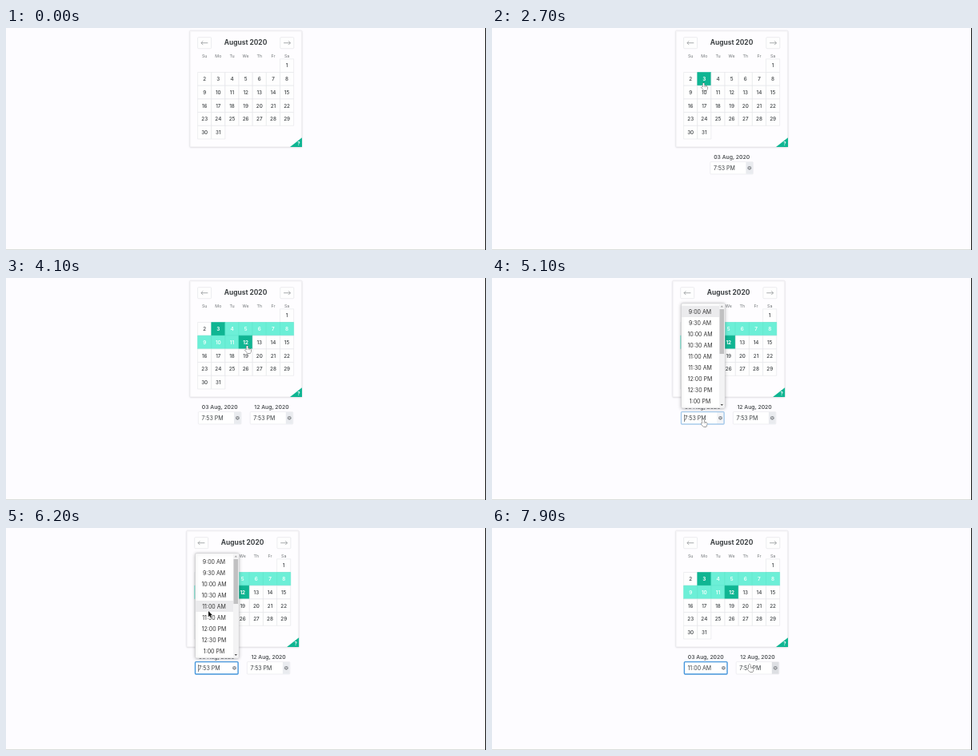
An HTML page with a canvas for the animation above (8000 ms loop, 600x278 px).

```html
<!DOCTYPE html>
<html lang="en">
<head>
<meta charset="utf-8">
<title>Date and time range picker</title>
<style>
  html, body { margin: 0; width: 100%; height: 100%; overflow: hidden; background: #fdfcff; }
  canvas { display: block; width: 600px; height: 278px; }
</style>
</head>
<body>
<canvas id="stage"></canvas>
<script>
const LOOP = 8000;
const PICK_START = 2700, PICK_END = 4100, OPEN = 5100, CLOSE = 7000;
const GREEN = '#0fb592', INK = '#3c4043';
const GRID = { x: 239.6, y: 38.8, w: 17.15, h: 16.7 };
const TIMES = ['9:00 AM', '9:30 AM', '10:00 AM', '10:30 AM', '11:00 AM',
  '11:30 AM', '12:00 PM', '12:30 PM', '1:00 PM'];

// Pointer path: time, x, y
const PATH = [
  [300, 462, 49], [400, 372, 47], [500, 316, 51], [600, 316, 51], [1200, 264.5, 68.5],
  [3100, 264.5, 68.5], [3200, 288.5, 76.5], [3400, 295, 80], [3700, 295, 80],
  [3800, 301.5, 84.5], [4300, 301.5, 84.5], [4800, 264, 176.5], [5500, 264, 176.5],
  [6200, 253, 104], [6400, 250.5, 101], [6500, 250.5, 97], [7200, 250.5, 97], [7900, 322, 170.5]
];

const HAND = new Path2D('M-1 .8Q0 -.5 1 .8V3.6L4 4.4Q5 4.7 4.8 6.4L4 9.6H.3L-2.6 6.2Q-2.8 4.9 -1 5.8Z');
const ARROW = new Path2D('M0 0V7.2L1.7 5.7L2.8 8.2L4 7.7L2.9 5.3H5.1Z');

const canvas = document.getElementById('stage');
const ctx = canvas.getContext('2d');
const ratio = window.devicePixelRatio || 1;
canvas.width = 600 * ratio;
canvas.height = 278 * ratio;

function box(x, y, w, h, fill, stroke, line = 0.6, radius = 0) {
  ctx.beginPath();
  ctx.roundRect(x, y, w, h, radius);
  if (fill) { ctx.fillStyle = fill; ctx.fill(); }
  if (stroke) { ctx.strokeStyle = stroke; ctx.lineWidth = line; ctx.stroke(); }
}

function shadowed(blur, color, draw) {
  ctx.save();
  ctx.shadowBlur = blur * ratio;
  ctx.shadowColor = color;
  ctx.shadowOffsetY = 0.6 * ratio;
  draw();
  ctx.restore();
}

function text(string, x, y, size, color = INK, weight = 400, align = 'center') {
  ctx.font = `${weight} ${size}px Inter, sans-serif`;
  ctx.textAlign = align;
  ctx.textBaseline = 'alphabetic';
  ctx.fillStyle = color;
  ctx.fillText(string, x, y + size * 0.36);
}

function line(points, color, width) {
  ctx.beginPath();
  points.forEach(([x, y]) => ctx.lineTo(x, y));
  ctx.strokeStyle = color;
  ctx.lineWidth = width;
  ctx.stroke();
}

function triangle(points, color) {
  ctx.beginPath();
  points.forEach(([x, y]) => ctx.lineTo(x, y));
  ctx.fillStyle = color;
  ctx.fill();
}

function pointerAt(time) {
  if (time < PATH[0][0]) return null;
  let i = PATH.findIndex(key => key[0] > time);
  if (i < 0) i = PATH.length;
  const [t0, x0, y0] = PATH[i - 1];
  const [t1, x1, y1] = PATH[i] || [LOOP, x0, y0];
  const u = (time - t0) / (t1 - t0);
  const e = t1 - t0 > 300 ? u * u * (3 - 2 * u) : u;
  return { x: x0 + (x1 - x0) * e, y: y0 + (y1 - y0) * e };
}

function dayAt(p) {
  const col = Math.floor((p.x - GRID.x) / GRID.w);
  const row = Math.floor((p.y - GRID.y) / GRID.h);
  const day = row * 7 + col - 5;
  return col >= 0 && col < 7 && row >= 0 && day >= 1 && day <= 31 ? day : 0;
}

function dayStyle(day, time, hovered) {
  const started = time >= PICK_START, ended = time >= PICK_END;
  if ((started && day === 3) || (ended && day === 12)) return [GREEN, GREEN, '#fff', 700];
  if (ended && day > 3 && day < 12) return ['#6cefd7', '#59e6cb', '#f4fffc', 600];
  if (started && !ended && day > 3 && day <= hovered)
    return [day === hovered ? '#a3ecdf' : '#b1f5e9', '#8be5d6', '#187d70', 400];
  if (day === hovered) return ['#dfe3e3', '#d8dddd', INK, 600];
  return ['#fefefe', '#e2e4e7', INK, 400];
}

function navButton(x, dir) {
  box(x, 11.7, 17, 14, '#fefefe', '#dfe1e4', 0.6, 1);
  const cx = x + 8.5, tip = cx + 4.2 * dir;
  line([[cx - 4.2 * dir, 18.7], [tip, 18.7]], '#85898c', 0.7);
  line([[tip - 2.4 * dir, 16.3], [tip, 18.7], [tip - 2.4 * dir, 21.1]], '#85898c', 0.7);
}

function calendar(time, hovered) {
  shadowed(2, 'rgba(0,0,0,.12)', () => box(229.7, 3.2, 140.2, 145.8, '#fefdff', '#e9e8ec', 0.6, 1));
  navButton(239.6, -1);
  navButton(342.8, 1);
  text('August 2020', 299.5, 17.9, 8.4, INK, 700);
  ['Su', 'Mo', 'Tu', 'We', 'Th', 'Fr', 'Sa'].forEach((name, i) =>
    text(name, GRID.x + GRID.w * (i + 0.5), 35.4, 5.3, '#707477'));
  for (let day = 1; day <= 31; day++) {
    const slot = day + 5;
    const x = GRID.x + slot % 7 * GRID.w, y = GRID.y + Math.floor(slot / 7) * GRID.h;
    const [fill, border, color, weight] = dayStyle(day, time, hovered);
    box(x, y, GRID.w, GRID.h, fill, border, 0.6);
    text(day, x + GRID.w / 2, y + GRID.h / 2, 6.3, color, Math.max(weight, 500));
  }
  triangle([[370, 137.3], [370, 149], [355, 149]], GREEN);
  text('?', 366, 145.3, 6, '#fff', 700);
}

function timeField(center, date, value, { focus = 0, caret = false, hover = false } = {}) {
  const x = center - 26.8, y = 167.6;
  text(date, center, 162, 6.85, INK, 500);
  box(x, y, 53.6, 15.4, '#fff', '#e4e5e9', 0.6, 1);
  box(x + 44.6, y + 0.3, 8.7, 14.8, hover ? '#dddfe3' : '#e9ebef');
  if (focus) {
    ctx.globalAlpha = focus;
    box(x, y, 53.6, 15.4, '#fff', '#4596dc', 1.4, 1);
    ctx.globalAlpha = 1;
  }
  text(value, x + 4.1, 175.3, 7, INK, 400, 'left');
  if (caret) line([[x + 4, 171], [x + 4, 180]], '#333', 0.6);
  const cx = x + 49, cy = 175.3;
  ctx.beginPath();
  ctx.arc(cx, cy, 2.4, 0, 7);
  ctx.fillStyle = '#8b8f94';
  ctx.fill();
  line([[cx - 1, cy - 1], [cx + 1, cy + 1]], '#fff', 0.7);
  line([[cx - 1, cy + 1], [cx + 1, cy - 1]], '#fff', 0.7);
}

function timeFields(time, pointer) {
  if (time < PICK_START) return;
  if (time < PICK_END) return timeField(299.6, '03 Aug, 2020', '7:53 PM');
  const open = time >= OPEN && time < CLOSE;
  timeField(267.2, '03 Aug, 2020', time < CLOSE ? '7:53 PM' : '11:00 AM', {
    focus: time < OPEN ? 0 : Math.min(1, 0.45 + (time - OPEN) / 360),
    caret: open && (time - OPEN) % 1070 < 535
  });
  timeField(332, '12 Aug, 2020', '7:53 PM',
    { hover: pointer.x > 305 && pointer.y > 167 });
}

function dropdown(pointer) {
  const active = pointer.y > 161 ? 0 : Math.floor((pointer.y - 35) / 14);
  shadowed(4, 'rgba(0,0,0,.25)', () => box(236.6, 31.6, 54.4, 131.4, '#fff', '#c9c9cd', 0.6, 1.5));
  TIMES.forEach((label, i) => {
    if (i === active) box(237, 35 + i * 14, 47, 14, '#ebebed');
    text(label, 260, 42.2 + i * 14, 7, '#333');
  });
  box(284, 32.2, 6.7, 130.4, '#f3f3f4');
  box(284.5, 39, 5.6, 56, '#c1c1c2');
  triangle([[287.3, 34.6], [289, 36.6], [285.6, 36.6]], '#a3a3a3');
  triangle([[287.3, 160], [289, 158], [285.6, 158]], '#505050');
}

function drawPointer(p, hand) {
  ctx.save();
  ctx.translate(p.x, p.y);
  ctx.lineJoin = 'round';
  ctx.lineWidth = 0.8;
  ctx.fillStyle = hand ? '#fff' : '#111';
  ctx.strokeStyle = hand ? '#333' : '#fff';
  const shape = hand ? HAND : ARROW;
  ctx.stroke(shape);
  ctx.fill(shape);
  if (hand) {
    line([[1.1, 3.8], [1.1, 5.6]], '#555', 0.5);
    line([[2.9, 4.3], [2.9, 5.8]], '#555', 0.5);
  }
  ctx.restore();
}

function render() {
  // The pointer and the page advance ten times a second
  const time = Math.floor(performance.now() % LOOP / 100) * 100;
  const pointer = pointerAt(time);
  const open = time >= OPEN && time < CLOSE;
  const hovered = pointer && !open ? dayAt(pointer) : 0;

  ctx.setTransform(ratio, 0, 0, ratio, 0, 0);
  box(0, 0, 600, 278, '#fdfcff');
  ctx.save();
  if (open) ctx.translate(-3.9, 0);
  calendar(time, hovered);
  timeFields(time, pointer);
  ctx.restore();
  if (open) dropdown(pointer);
  box(0, 277, 600, 1, '#dadedb');
  box(599, 0, 1, 278, '#151515');
  if (pointer) drawPointer(pointer, hovered > 0 || pointer.y > 166);
  requestAnimationFrame(render);
}
render();
</script>
</body>
</html>
```
